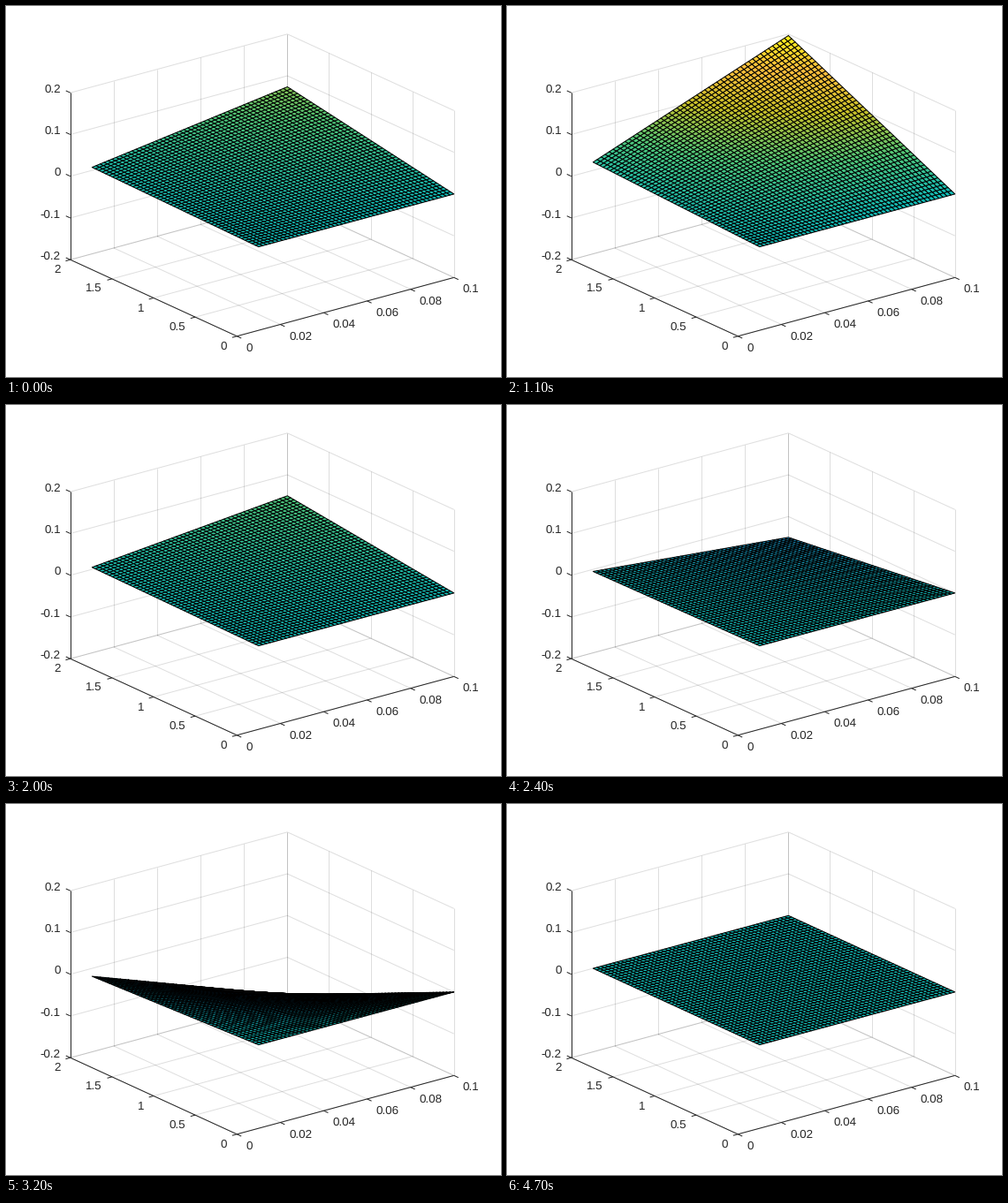
Animation of 560 by 420 pixels, one loop 4.8 s. Source, as a matplotlib script:

```python
import numpy as np
import matplotlib.pyplot as plt
from matplotlib.animation import FuncAnimation
from matplotlib.collections import LineCollection, PolyCollection
from matplotlib.colors import LinearSegmentedColormap, Normalize

WIDTH, HEIGHT, DPI = 560, 420, 100
PX = 72 / DPI
FRAMES, INTERVAL = 48, 100
STEPS_PER_CYCLE, START_STEP = 50, 3
MESH = 50
INK = (0.15, 0.15, 0.15)

# Orthographic view of a unit cube stretched to fill the plot area
BOX_W, BOX_H = 434, 342
AZIMUTH, ELEVATION = np.radians([37.5, 30])
COS_A, SIN_A = np.cos(AZIMUTH), np.sin(AZIMUTH)
COS_E, SIN_E = np.cos(ELEVATION), np.sin(ELEVATION)
SCALE = np.array([BOX_W / (COS_A + SIN_A),
                  BOX_H / ((COS_A + SIN_A) * SIN_E + COS_E)])
BASIS = SCALE * [[COS_A, -SIN_A * SIN_E],
                 [-SIN_A, -COS_A * SIN_E],
                 [0, -COS_E]]
ORIGIN = np.array([260.7, 373.3])
LOW = np.array([0, 0, -0.2])
HIGH = np.array([0.1, 2, 0.2])
TICKS = [np.linspace(lo, hi, n) for lo, hi, n in zip(LOW, HIGH, (6, 5, 5))]

CMAP = LinearSegmentedColormap.from_list("surface", [
    "#3e26a8", "#464ced", "#3879fa", "#1ba2e1", "#12beb9",
    "#51c878", "#c8c129", "#febe3d", "#f9fb15"])
NORM = Normalize(LOW[2], HIGH[2])


def project(points):
    return ORIGIN + (np.asarray(points) - LOW) / (HIGH - LOW) @ BASIS


def on_edge(start, axis, value):
    point = np.array(start, dtype=float)
    point[axis] = value
    return point


def draw_lines(lines, color, zorder):
    ax.add_collection(LineCollection(lines, colors=[color], linewidths=PX,
                                     zorder=zorder), autolim=False)


def draw_grid():
    """Each tick continues across the two back faces it touches."""
    back = np.array([HIGH[0], HIGH[1], LOW[2]])
    front = LOW + HIGH - back
    lines = []
    for axis, ticks in enumerate(TICKS):
        for value in ticks:
            corner = on_edge(back, axis, value)
            for other in {0, 1, 2} - {axis}:
                end = on_edge(corner, other, front[other])
                lines.append(project([corner, end]))
    draw_lines(lines, INK + (0.15,), 1)


def draw_ruler(axis, start, direction, offset, align):
    lines = [project([on_edge(start, axis, LOW[axis]),
                      on_edge(start, axis, HIGH[axis])])]
    for value in TICKS[axis]:
        point = project(on_edge(start, axis, value))
        lines.append([point, point + 5.5 * direction / np.hypot(*direction)])
        ax.text(*(point + offset), f"{value:g}", ha=align, va="baseline",
                family="Liberation Sans", size=13.33 * PX, color=INK)
    draw_lines(lines, INK, 2)


plt.rcParams["text.hinting"] = "none"
fig = plt.figure(figsize=(WIDTH / DPI, HEIGHT / DPI), dpi=DPI, facecolor="white")
ax = fig.add_axes([0, 0, 1, 1])
ax.set_xlim(-0.5, WIDTH - 0.5)
ax.set_ylim(HEIGHT - 0.5, -0.5)
ax.axis("off")

draw_grid()
draw_ruler(0, LOW, -BASIS[1], (10, 17), "left")
draw_ruler(1, LOW, -BASIS[0], (-11, 15), "right")
draw_ruler(2, (LOW[0], HIGH[1], LOW[2]), BASIS[1], (-11, -0.6), "right")

# Descending coordinates put the farthest cells first, nearest last
grid_x, grid_y = np.meshgrid(np.linspace(0.1, 0.01, MESH),
                             np.linspace(2, 0, MESH))
surface = PolyCollection([], edgecolors="black", linewidths=PX, zorder=3)
ax.add_collection(surface, autolim=False)


def update(frame):
    phase = 2 * np.pi * (frame + START_STEP) / STEPS_PER_CYCLE
    z = grid_x * grid_y * np.sin(phase)
    p = project(np.stack([grid_x, grid_y, z], axis=-1))
    quads = np.stack([p[:-1, :-1], p[:-1, 1:], p[1:, 1:], p[1:, :-1]], axis=2)
    surface.set_verts(quads.reshape(-1, 4, 2))
    surface.set_facecolor(CMAP(NORM(z[1:, 1:].ravel())))
    return [surface]


animation = FuncAnimation(fig, update, frames=FRAMES, interval=INTERVAL,
                          repeat=True, repeat_delay=0)
plt.show()
```
